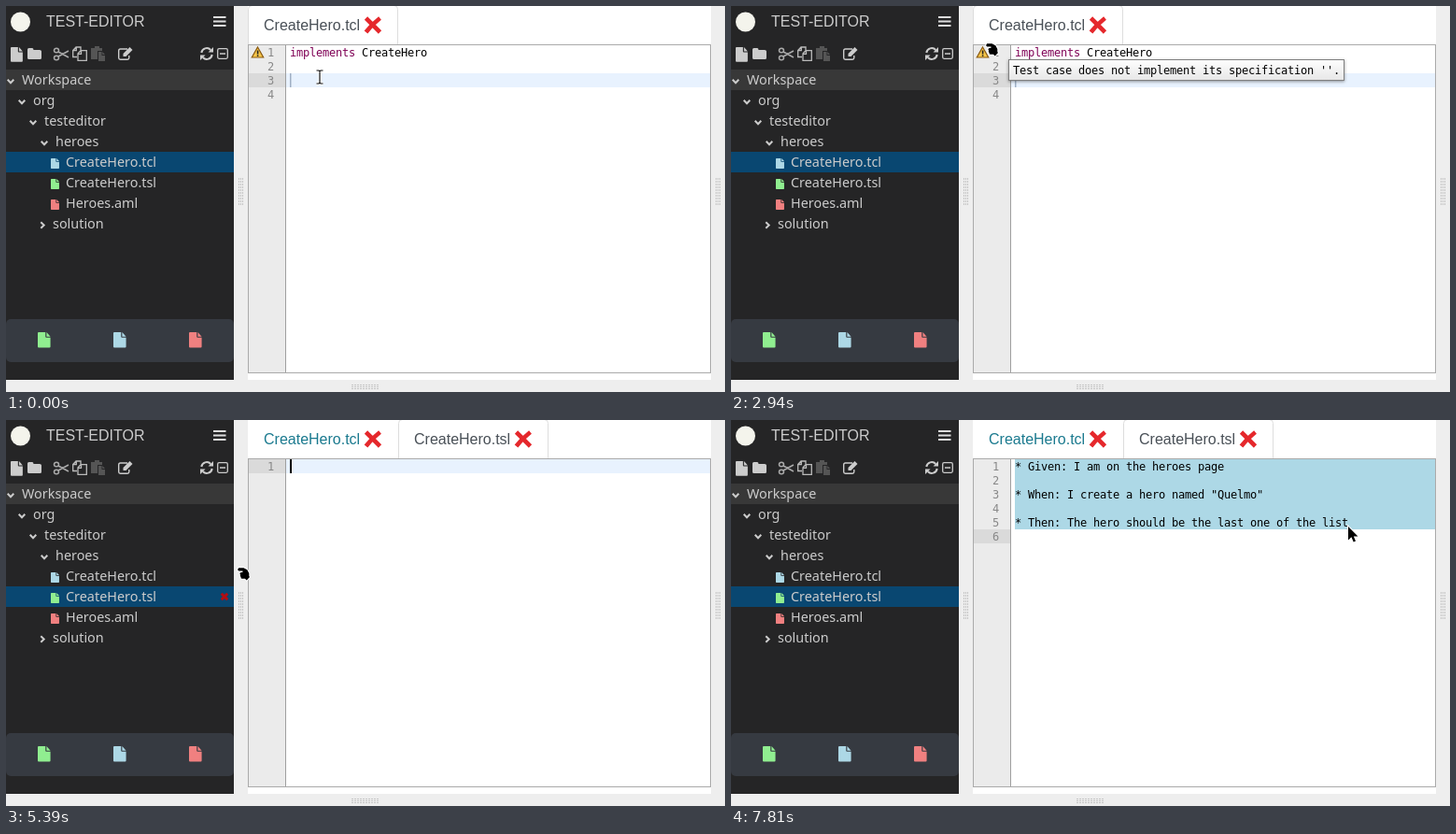
An HTML page with a canvas that plays this animation: 770x413 px, repeating every 8 s.

```html
<!DOCTYPE html>
<html lang="en">
<head>
<meta charset="utf-8">
<title>Test editor</title>
<style>
html, body { margin: 0; width: 100%; height: 100%; overflow: hidden; background: #eee; }
canvas { display: block; }
</style>
</head>
<body>
<canvas id="stage" width="770" height="413"></canvas>
<script>
const ctx = document.getElementById('stage').getContext('2d');
const LOOP = 8000;
const SANS = '16px "Liberation Sans", Arial, sans-serif';
const TREE = '14.4px "Noto Sans", "Open Sans", sans-serif';
const MONO = '12px "DejaVu Sans Mono", monospace';
const GREEN = '#90ee90', BLUE = '#add8e6', CORAL = '#f08080';
const LEFT = 304, TOP = 42, ROW = 15, COL = 7, RIGHT = 754;

// Event times in ms
const CLICK = 4450, OPEN = 5300, LOADED = 5440, CARET_OFF = 5930, CARET_ON = 6380,
      DRAG = 6560, DRAG_END = 7270, DRAG_BLINK = 7770;

const SPEC = [
  '* Given: I am on the heroes page', '',
  '* When: I create a hero named "Quelmo"', '',
  '* Then: The hero should be the last one of the list', ''
];
const WARNING = "Test case does not implement its specification ''.";

// Pointer path: time, x, y
const MOVES = [
  [0, 336, 76], [260, 336, 76], [1040, 289, 54], [1200, 287, 50], [1960, 287, 50],
  [2360, 248, 32], [2740, 274, 40], [2940, 273, 39], [3080, 271, 42], [3580, 258, 150],
  [3820, 57, 198], [4060, 132, 188], [5120, 132, 188], [5390, 248, 157], [5920, 322, 76],
  [6240, 302, 50], [DRAG, 302, 50], [DRAG_END, 667, 124], [7670, 667, 124], [7810, 661, 114]
];

const P = d => new Path2D(d);
const FILE = P('M8.5 5V0H1Q0 0 0 1V16Q0 17 1 17H13Q14 17 14 16V6H9.5Q8.5 6 8.5 5ZM9.7 0 14 4.8H9.7Z');
const FOLDER = P('M0 1.5Q0 0 1.5 0H5Q6.5 0 6.5 2H13Q15 2 15 3.5V10.5Q15 12 13.5 12H1.5Q0 12 0 10.5Z');
const SCISSORS = P('M5 5.5 16 11.5M5 10.5 16 4.5M5.5 4A2.5 2.3 0 1 1 .5 4A2.5 2.3 0 1 1 5.5 4M5.5 12A2.5 2.3 0 1 1 .5 12A2.5 2.3 0 1 1 5.5 12');
const COPY = P('M5 11.5H.7V4.5L4 1H9V4M4.3 1V4.5H.7M6 8 9 4.7H15.3V15.3H6ZM9.5 4.7V8.3H6');
const PASTE = P('M0 2H4V0H9V2H12V5H7V14H0ZM8 6H11.5V10H15V16H8ZM12.3 6 15 9H12.3Z');
const EDIT = P('M10 2.5H2.5Q.7 2.5 .7 4.5V12Q.7 13.7 2.5 13.7H10Q11.8 13.7 11.8 12V9.5');
const PENCIL = P('M5 8 12 1 15 4 8 11H5Z');
const REFRESH = P('M1.3 6A5.7 5.7 0 0 1 11.2 3M12.7 8A5.7 5.7 0 0 1 2.8 11');
const REFRESH_TIPS = P('M14 0V5.5H8.5ZM0 14V8.5H5.5Z');
const CHEVRON = P('M-3.3-1.7 0 1.7 3.3-1.7');
const CROSS = P('M0 0 15 15M15 0Q6 7 0 15');
const TIMES = P('M0 0 6.5 6.5M6.5 0 0 6.5');
const TRIANGLE = P('M6.5 .5 12.7 11.5H.3Z');
const ARROW = P('M0 0V14.5L3.4 11.3 5.7 16.5 8 15.5 5.8 10.4H10.4Z');
const HAND = P('M1.2 1.2H6.5L10.3 3.2 12.3 7V10L13 11 9.7 14.5 8 12.8H4.6Q3 12.6 3.6 11 2.2 10.3 3 8.6 1.8 7.6 3 6.2L5.5 5.8V4.4H1.2Q-.8 3 1.2 1.2Z');
const BEAM = P('M-3.5-7H-1L0-6.2 1-7H3.5M-3.5 7H-1L0 6.2 1 7H3.5M0-6.5V6.5');

function box(x, y, w, h, color) {
  ctx.fillStyle = color;
  ctx.fillRect(x, y, w, h);
}

function fill(path, x, y, color, scale = 1) {
  ctx.save();
  ctx.translate(x, y);
  ctx.scale(scale, scale);
  ctx.fillStyle = color;
  ctx.fill(path);
  ctx.restore();
}

function line(path, x, y, color, width, turn = 0) {
  ctx.save();
  ctx.translate(x, y);
  ctx.rotate(turn);
  ctx.strokeStyle = color;
  ctx.lineWidth = width;
  ctx.stroke(path);
  ctx.restore();
}

function text(str, x, y, color, font) {
  ctx.font = font;
  ctx.fillStyle = color;
  ctx.fillText(str, x, y);
}

// Code sits on a whole-pixel column grid
function code(str, x, y, color) {
  ctx.font = MONO;
  ctx.letterSpacing = '0px';
  ctx.letterSpacing = COL - ctx.measureText('0').width + 'px';
  text(str, x, y, color, MONO);
  ctx.letterSpacing = '0px';
}

function pointerAt(t) {
  let i = MOVES.length - 1;
  while (MOVES[i][0] > t) i--;
  const [t0, x0, y0] = MOVES[i];
  const [t1, x1, y1] = MOVES[i + 1] || [LOOP, x0, y0];
  const u = (t - t0) / (t1 - t0);
  const k = u * u * (3 - 2 * u);
  return { x: x0 + (x1 - x0) * k, y: y0 + (y1 - y0) * k };
}

function grip(x, y, upright) {
  for (let i = 0; i < 10; i++)
    for (let j = 0; j < 3; j++)
      if (upright) box(x + j * 2, y + i * 3, 1, 2, '#c4c4c4');
      else box(x + i * 3, y + j * 2, 2, 1, '#c4c4c4');
}

function toolbar() {
  const c = '#ccc';
  fill(FILE, 5, 44, c, 0.92);
  fill(FOLDER, 23, 45, c);
  line(SCISSORS, 51, 43.5, '#aaa', 1.5);
  line(COPY, 71, 43, '#bbb', 1.3);
  fill(PASTE, 91, 43, '#555');
  line(EDIT, 120, 43.5, c, 1.4);
  fill(PENCIL, 120.5, 43, c);
  line(REFRESH, 208, 44, c, 2);
  fill(REFRESH_TIPS, 208, 44, c);
  ctx.strokeStyle = c;
  ctx.lineWidth = 1.3;
  ctx.beginPath();
  ctx.roundRect(226.7, 45.7, 10.6, 10.6, 1.5);
  ctx.stroke();
  box(229, 50.3, 6, 1.5, c);
}

function treeRow(label, x, row, chevron, turn = 0) {
  const y = 79 + row * 22;
  text(label, x, y + 5, '#ccc', TREE);
  if (chevron) line(CHEVRON, chevron, y + 1.5, '#ccc', 2, turn);
}

function sidebar(t, mouse) {
  box(0, 0, 244, 400, '#252526');
  ctx.fillStyle = '#f4f4ec';
  ctx.beginPath();
  ctx.arc(15.5, 17, 10.5, 0, 7);
  ctx.fill();
  text('TEST-EDITOR', 43, 22, '#ccc', SANS);
  for (let i = 0; i < 3; i++) box(222, 11 + i * 4.5, 13.5, 2, '#ddd');
  toolbar();

  box(0, 68, 244, 22, '#383838');
  const active = t < CLICK ? 4 : 5;
  box(0, 68 + active * 22, 244, 22, '#094771');
  treeRow('Workspace', 17, 0, 5);
  treeRow('org', 29, 1, 17);
  treeRow('testeditor', 41, 2, 29);
  treeRow('heroes', 53, 3, 41);
  treeRow('CreateHero.tcl', 64, 4);
  treeRow('CreateHero.tsl', 64, 5);
  treeRow('Heroes.aml', 64, 6);
  treeRow('solution', 50, 7, 39, -Math.PI / 2);
  [BLUE, GREEN, CORAL].forEach((c, i) => fill(FILE, 48, 163 + i * 22, c, 0.64));

  const inTree = t > 3620 && t < 5120 && mouse.x < 244;
  const hover = t >= 5120 && t < LOADED ? 5 : inTree ? Math.floor((mouse.y - 68) / 22) : -1;
  if (hover >= 4 && hover <= 6) line(TIMES, 230.7, 75.7 + hover * 22, '#b30d12', 3);

  ctx.fillStyle = '#363a41';
  ctx.beginPath();
  ctx.roundRect(0, 335, 244, 46, 5);
  ctx.fill();
  [GREEN, BLUE, CORAL].forEach((c, i) => fill(FILE, 34 + i * 81, 349, c, 0.97));
}

function tab(label, x, active) {
  if (active) {
    ctx.strokeStyle = '#ddd';
    ctx.lineWidth = 1;
    ctx.beginPath();
    ctx.roundRect(x + 0.5, -0.5, 160, 46, 4);
    ctx.stroke();
  }
  text(label, x + 17, 26, active ? '#495057' : '#1b7a8f', SANS);
  line(CROSS, x + 126.5, 13, '#e5282c', 4.6);
}

function gutter(count, activeRow) {
  box(260, TOP, 39, 350, '#ebebeb');
  box(260, TOP + activeRow * ROW, 39, ROW, '#dadada');
  box(299, TOP, 1, 350, '#9f9f9f');
  for (let i = 0; i < count; i++) code(String(i + 1), 280, 54 + i * ROW, '#888');
}

function caret(row, col) {
  box(LEFT + col * COL, TOP + row * ROW, 2, ROW, '#000');
}

function testCase() {
  gutter(4, 2);
  box(300, TOP + 2 * ROW, RIGHT - 300, ROW, '#e8f2fe');
  box(LEFT, TOP + 2 * ROW, 1.5, ROW, '#9fb0c4');
  fill(TRIANGLE, 263, 43.5, '#f6c64a');
  line(TRIANGLE, 263, 43.5, '#8a5a12', 1.2);
  box(268.8, 47.5, 1.6, 4, '#222');
  box(268.8, 52.4, 1.6, 1.5, '#222');
  code('implements', LEFT, 54, '#7f0055');
  code('CreateHero', LEFT + 11 * COL, 54, '#000');
}

function spec(t, mouse) {
  const lines = t < LOADED ? [''] : SPEC;
  const dragging = t >= DRAG;
  let row = lines.length - 1, col = 0;
  if (dragging) {
    row = Math.min(5, Math.floor((mouse.y - TOP) / ROW));
    if (t >= DRAG_END) row = 5;
    col = Math.max(0, Math.min(SPEC[row].length, Math.round((mouse.x - LEFT) / COL)));
  }
  gutter(lines.length, row);
  if (row + col === 0 || !dragging) {
    box(300, TOP + row * ROW, RIGHT - 300, ROW, '#e8f2fe');
  } else {
    box(LEFT, TOP, RIGHT - LEFT, row * ROW, BLUE);
    box(LEFT, TOP + row * ROW, col * COL, ROW, BLUE);
  }
  lines.forEach((s, i) => code(s, LEFT, 54 + i * ROW, '#000'));
  const hidden = (t >= CARET_OFF && t < CARET_ON) || t >= DRAG_BLINK;
  if (!hidden) caret(row, col);
}

function tooltip(x, y) {
  const w = 360, h = 23;
  ctx.save();
  ctx.shadowColor = 'rgba(0,0,0,.4)';
  ctx.shadowBlur = 3;
  ctx.shadowOffsetY = 1;
  box(x, y, w, h, '#808080');
  ctx.restore();
  const shade = ctx.createLinearGradient(0, y, 0, y + h);
  shade.addColorStop(0, '#fff');
  shade.addColorStop(1, '#e6e6e6');
  box(x + 1, y + 1, w - 2, h - 2, shade);
  code(WARNING, x + 5, y + 16, '#000');
}

function pointer(t, { x, y }) {
  if (t < 7700 && x >= 299) {
    line(BEAM, x, y, '#fff', 3);
    line(BEAM, x, y, '#111', 1.2);
    return;
  }
  const shape = x < 250 || (x < 277 && y < 58) ? HAND : ARROW;
  line(shape, x, y, '#fff', 2);
  fill(shape, x, y, '#000');
}

function draw(t) {
  const mouse = pointerAt(t);
  box(0, 0, 770, 413, '#eee');
  box(259, 0, 496, 400, '#fff');
  sidebar(t, mouse);
  grip(249, 184, true);
  grip(760, 184, true);
  grip(370, 405, false);

  const opened = t >= OPEN;
  tab('CreateHero.tcl', 259, !opened);
  if (opened) tab('CreateHero.tsl', 420, true);
  box(259, 41, 496, 352, '#aaa');
  box(260, TOP, 494, 350, '#fff');
  if (opened) spec(t, mouse);
  else testCase();

  if (t >= 1020 && t < 2160) tooltip(Math.round(mouse.x) + 15, Math.round(mouse.y) + 15);
  else if (t >= 2620 && t < 3080) tooltip(297, 57);
  pointer(t, mouse);
}

const start = performance.now();
function tick() {
  draw((performance.now() - start) % LOOP);
  requestAnimationFrame(tick);
}
tick();
</script>
</body>
</html>
```
